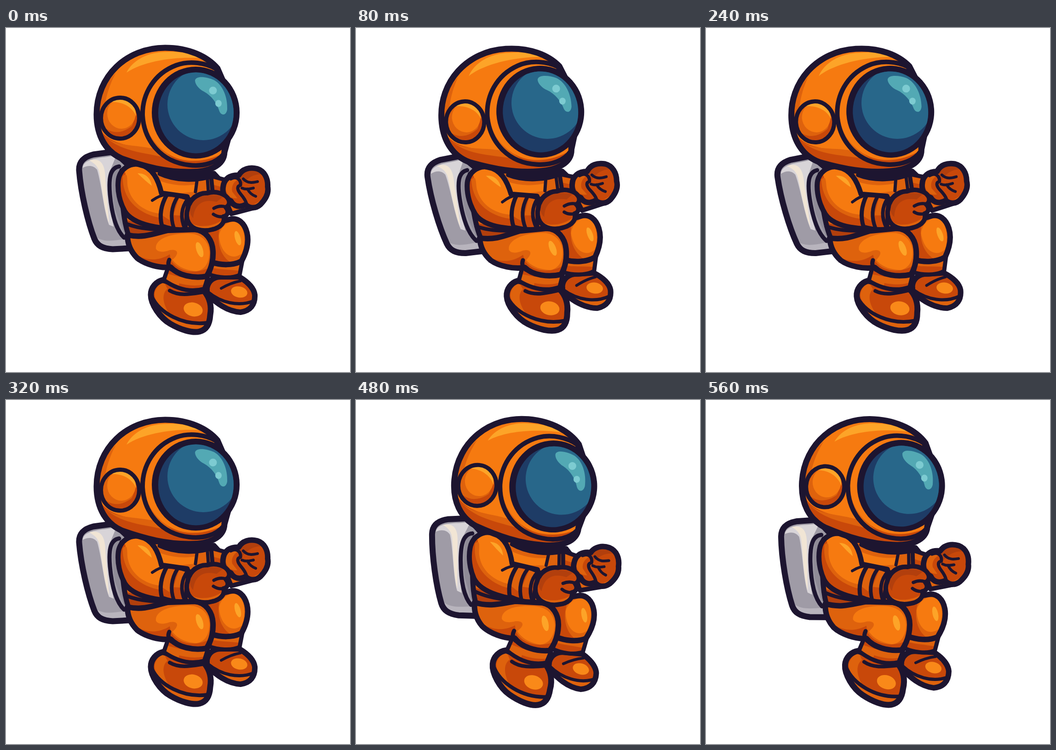
Recreate the animation shown at these times as an HTML page. Size 748 by 748 pixels, loop 0.64 s.

```html
<!DOCTYPE html>
<html lang="en">
<head>
<meta charset="utf-8">
<title>Floating astronaut</title>
<style>
  html, body { margin: 0; width: 100%; height: 100%; overflow: hidden; background: #fff; }
  svg { display: block; width: 100%; height: 100%; }
</style>
</head>
<body>
<svg viewBox="0 0 748 748"><g id="suit" stroke-linejoin="round" stroke-linecap="round"></g></svg>
<script>
const INK = '#1d1530', ORANGE = '#f67a10', MID = '#de620d', DEEP = '#c8480a', RUST = '#b23f0d', GLOW = '#fda428';
const suit = document.getElementById('suit');
let clips = 0;

const fill = (d, color) => `<path d="${d}" fill="${color}"/>`;
const line = (d, w = 8) => `<path d="${d}" fill="none" stroke="${INK}" stroke-width="${w}"/>`;
const oval = (x, y, rx, ry, turn = 0) => {
  const a = turn * Math.PI / 180, dx = rx * Math.cos(a), dy = rx * Math.sin(a);
  return `M${x - dx} ${y - dy}A${rx} ${ry} ${turn} 0 1 ${x + dx} ${y + dy}A${rx} ${ry} ${turn} 0 1 ${x - dx} ${y - dy}Z`;
};

// A filled shape, shading clipped to it, then its outline.
function part(d, color, w, ...shades) {
  const id = 'c' + clips++;
  return `<clipPath id="${id}"><path d="${d}"/></clipPath>${fill(d, color)}` +
    `<g clip-path="url(#${id})">${shades.join('')}</g>${line(d, w)}`;
}

const backpack = () => part(
  'M159 310C158 290 170 280 190 275L235 269L290 320L285 478L232 481C210 480 198 473 192 458C178 422 163 360 159 310Z', '#9f9ba6', 13,
  fill('M167 304C168 290 185 284 215 281L240 277L228 306C218 320 220 350 226 390L234 432L224 428C212 395 208 340 198 308C190 298 178 298 167 304Z', '#d8d4d8'),
  fill('M181 288C205 281 215 295 216 325L224 424C212 390 208 340 203 314C200 300 192 294 181 288Z', '#f1e5d5'),
  fill('M196 455C215 467 235 462 266 458V486H205Z', '#b8b4bd'),
  fill('M245 302C227 310 230 350 237 395L256 445H280V300Z', '#8f8b97')
) + line('M246 301C226 304 223 328 226 362C230 405 240 440 257 456', 9);

const torso = () => part(
  'M252 310L330 308C370 325 415 325 452 316L476 342L470 440L300 462L266 450C256 420 250 370 252 310Z', MID, 11,
  fill('M336 333C365 343 390 344 414 340L412 356L345 362Z', ORANGE),
  fill('M320 300H470V324C420 336 370 335 335 319Z', DEEP),
  fill('M250 402L340 428V460H255Z', RUST),
  fill('M252 395L272 408L310 428L256 417Z', MID)
) + line('M334 317C368 333 415 334 452 321', 9) + line('M415 334L412 356', 7) +
  line('M438 328L440 356', 7) + line('M258 424C280 434 310 438 340 438', 8);

const farArm = () => part('M446 322L484 332L482 372L450 366Z', DEEP, 9,
    fill('M444 326L470 334L466 345L447 340Z', MID)) +
  part('M478 376L520 366L536 392L490 404Z', DEEP, 10, fill('M480 390L535 380V404H480Z', MID)) +
  part('M472 346C474 327 488 319 506 320C514 306 530 302 546 306C562 311 570 327 569 345C572 360 563 374 553 384C543 393 530 393 521 384C508 391 495 388 489 376C476 371 470 360 472 346Z', DEEP, 12,
    fill('M508 322C520 306 542 306 555 318C540 318 526 324 514 340Z', RUST),
    fill('M477 346C480 330 492 325 504 330C496 334 489 344 492 356L503 370C487 372 478 360 477 346Z', MID),
    fill('M540 383C557 376 566 362 568 340L576 350L558 395Z', MID)) +
  line('M489 328C502 321 511 330 510 342C500 344 504 354 511 362C517 369 521 375 523 382', 7) +
  line('M513 348C522 352 529 350 538 348', 6) + line('M516 328C526 339 538 336 547 334', 6) +
  line('M525 350C529 358 535 363 543 366', 6);

const farLeg = () => part(
    'M437 565C440 548 454 540 470 541L507 541C524 551 539 565 541 580C542 602 531 615 510 618C480 616 458 598 437 579Z', DEEP, 12,
    fill(oval(507, 574, 18, 12, 12), '#f98919'),
    fill('M435 570C462 596 501 605 543 594V622H470Z', MID)) +
  line('M439 574C468 598 506 606 537 594', 7) + line('M468 566C482 558 494 553 510 550', 6) +
  part('M448 508L514 506L508 537C490 546 460 543 442 536Z', DEEP, 9,
    fill('M450 513L484 514L512 510L508 528C486 525 465 526 446 521Z', MID)) +
  part('M430 430L486 416C505 411 519 425 524 445C529 466 523 487 512 507C493 517 467 516 446 509Z', MID, 12,
    fill('M430 430L465 432C457 466 466 496 490 511H445Z', DEEP),
    fill('M463 452C466 430 490 414 506 424C521 438 521 470 513 490C492 508 466 490 463 452Z', ORANGE),
    fill(oval(504, 457, 6, 16, -16), GLOW));

const nearLeg = () => part(
    'M341 548C327 551 315 564 315 580C315 601 335 630 357 643C379 656 405 664 421 660C437 656 443 642 444 624C448 602 441 584 431 572Z', DEEP, 13,
    fill('M323 578C325 565 334 555 344 553L351 567C338 578 341 598 353 618C335 607 323 594 323 578Z', MID),
    fill(oval(407, 612, 21, 15, 14), '#f98919'),
    fill('M315 586C338 624 385 650 444 638V672H370Z', MID)) +
  line('M317 584C334 620 385 648 438 641', 8) + line('M356 571C378 584 404 578 430 574', 8) +
  part('M354 516L440 538L431 567C400 576 370 567 343 548Z', DEEP, 9,
    fill('M350 534L380 542L374 566L342 552Z', MID),
    fill('M378 541L434 543L430 558C410 562 392 559 376 555Z', MID)) +
  part('M264 450C300 458 325 446 352 440L410 438C435 440 449 462 450 485C451 507 445 526 436 540C407 545 374 538 358 520C335 523 302 514 285 500C270 485 264 468 264 450Z', MID, 12,
    fill('M260 470C285 506 325 512 356 492L365 538H285Z', DEEP),
    fill('M326 480C324 459 355 448 390 447C420 445 440 460 442 486C443 510 432 526 414 529C391 527 373 519 362 504C378 490 374 480 356 483C343 488 330 488 326 480Z', ORANGE),
    fill('M358 504C373 529 407 537 440 522L434 548H360Z', DEEP),
    fill(oval(421, 482, 7, 17, -18), GLOW)) +
  line('M355 504C351 513 354 520 360 525', 9);

const nearArm = () => part(
    'M244 333C246 307 270 292 291 297C319 304 331 329 338 359L394 367L388 434C338 440 276 428 258 398C247 378 242 354 244 333Z', ORANGE, 11,
    fill('M240 320C255 305 264 310 258 329C255 366 285 401 338 409L342 440L260 415Z', DEEP),
    fill('M254 322C267 310 262 332 265 346C272 379 301 400 337 404L336 413C290 405 252 374 254 322Z', MID),
    fill('M286 316C303 315 314 326 317 343C306 335 296 325 286 316Z', GLOW)) +
  line('M318 375C329 367 338 363 351 362', 6) +
  part('M350 362C367 362 382 366 397 371L390 437C371 440 353 435 339 430C333 407 338 383 350 362Z', DEEP, 9,
    fill('M352 367L370 370C361 387 356 402 356 418L339 407C341 389 345 378 352 367Z', MID),
    fill('M376 370L397 374L383 408L364 407Z', MID)) +
  line('M373 367C359 389 357 412 365 435', 8) + line('M396 371C380 391 379 414 389 436', 8) +
  part('M395 394C399 371 417 358 438 359C457 353 478 361 484 373C488 382 483 388 478 390C486 399 482 408 473 410C477 422 467 434 449 438C427 444 405 438 397 423C392 414 392 402 395 394Z', DEEP, 10,
    fill('M400 386C412 363 445 359 472 367L458 378C430 371 410 382 407 413C401 408 398 398 400 386Z', RUST),
    fill('M398 421C417 437 450 432 471 417L466 442H410Z', MID)) +
  line('M452 392C461 387 471 387 478 389', 7) + line('M451 405C458 410 466 411 473 410', 7) +
  line('M401 383C407 369 421 362 440 359', 6);

const helmet = () => part(
    'M460 88C438 62 398 43 346 43C262 43 197 105 197 188C197 236 218 269 252 284C303 302 350 314 402 313C440 313 474 300 475 270L500 180Z', ORANGE, 13,
    fill('M200 195C204 145 216 121 239 97C222 130 212 162 214 203Z', MID),
    fill('M198 212C226 261 285 256 324 263C354 286 406 303 478 286V325H330L230 292Z', DEEP),
    fill('M214 234C241 260 286 253 320 263L338 280C294 270 247 268 214 234Z', MID),
    fill('M262 97C277 67 314 51 352 52C383 51 409 56 428 66C375 61 302 70 262 97Z', GLOW)) +
  part('M457 89C435 76 400 70 370 81C322 99 296 143 297 190C300 245 337 291 398 298C429 302 458 293 473 274L480 180Z', ORANGE, 10,
    fill('M302 203C314 253 355 286 400 288C433 290 459 281 475 270V307H370L315 265Z', MID),
    fill('M352 274C390 299 438 291 475 271V307H390Z', DEEP)) +
  fill(oval(412.5, 184, 95.5, 100), INK) +
  part(oval(413, 184.5, 82, 88), '#1e3c66', 0,
    fill(oval(429, 166, 78, 78), '#28678a'),
    fill('M411 114C413 103 436 106 452 113C472 124 482 151 481 177C479 191 468 191 464 181C459 164 447 147 430 138C420 133 411 123 411 114Z', '#53a9b4'),
    fill(oval(450, 136, 8.5, 8.5), '#7dcbd1'),
    fill(oval(462, 164, 7, 7.5), '#7dcbd1')) +
  part(oval(248, 196, 41.5, 44.5), DEEP, 9,
    fill(oval(241, 190, 38, 46), MID),
    fill('M206 210C235 239 267 226 290 196V250H210Z', DEEP),
    fill(oval(251, 186, 31, 33), ORANGE),
    fill('M231 161C248 145 282 157 283 192C276 174 256 160 231 161Z', GLOW));

suit.innerHTML = [backpack, torso, farArm, farLeg, nearLeg, nearArm, helmet].map(draw => draw()).join('');

// The body rocks 5 degrees each way in eight held poses.
const HOLD = 80, POSES = 8, SWING = 5, start = performance.now();

function update() {
  const pose = Math.floor((performance.now() - start) / HOLD) % POSES;
  const angle = -SWING * Math.sin(pose / POSES * 2 * Math.PI);
  suit.setAttribute('transform', `rotate(${angle.toFixed(3)} 374 374)`);
  requestAnimationFrame(update);
}
update();
</script>
</body>
</html>
```
